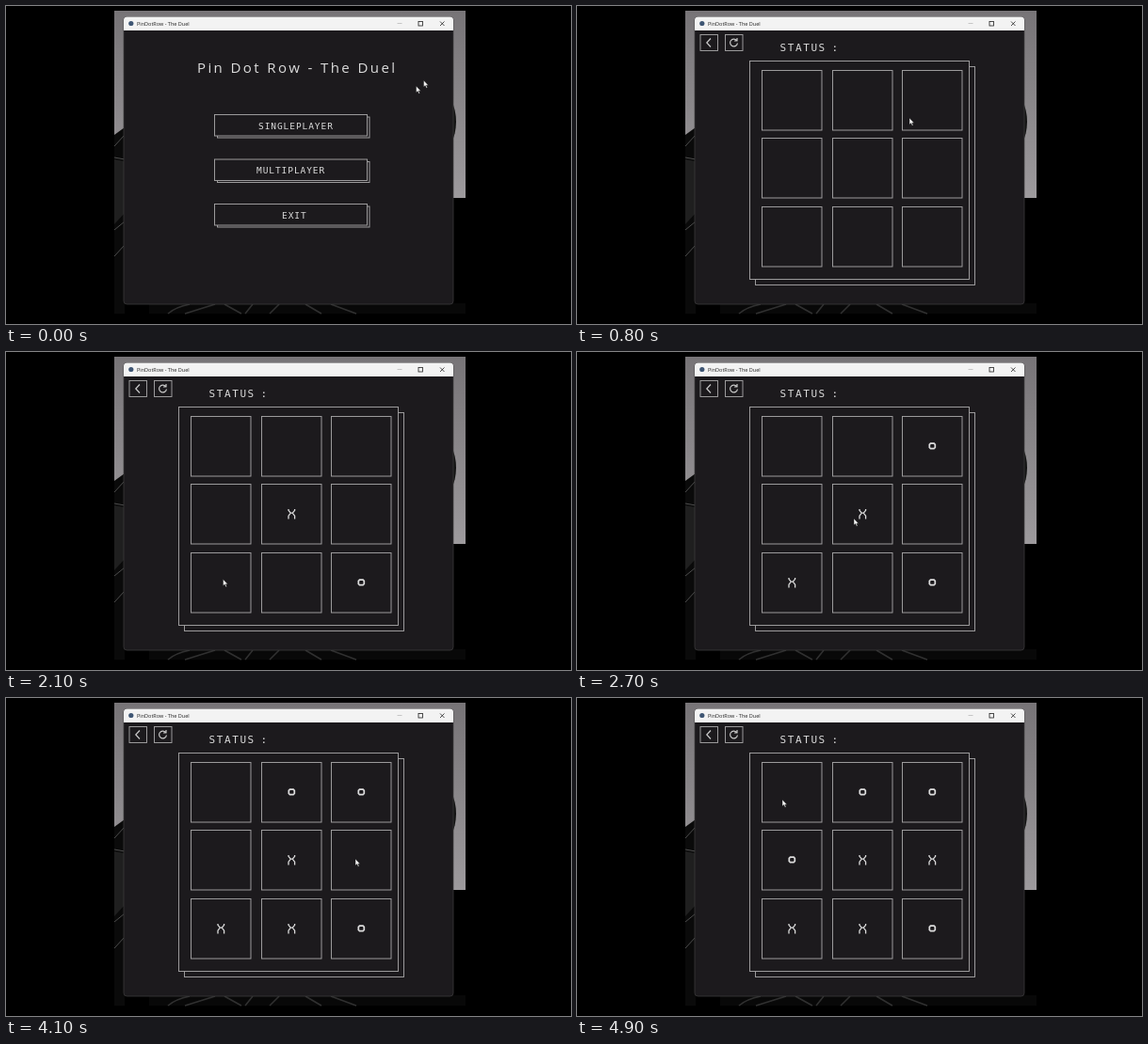
Animation, 600 px wide and 338 px high, one loop 5 s. Source, as an HTML page:

```html
<!DOCTYPE html>
<html lang="en">
<head>
<meta charset="utf-8">
<title>Board game</title>
<style>
  html, body { margin: 0; width: 100%; height: 100%; overflow: hidden; background: #000; }
  svg { display: block; width: 100vw; height: 100vh; }
  text { fill: #dcdcdc; white-space: pre; }
  .pixel { font: 9.5px "DejaVu Sans Mono", monospace; letter-spacing: .93px; }
  .status { font-size: 11px; letter-spacing: 1.6px; word-spacing: -2.5px; }
  .heading { font: 15px "Open Sans", sans-serif; letter-spacing: 2.4px; }
  .caption { font: 5.5px "Open Sans", sans-serif; fill: #222; }
  .box { fill: #1c1a1d; stroke: #a2a1a2; stroke-width: .95; }
  .icon { fill: none; stroke: #c8c8c8; stroke-width: 1.2; }
  .mark { fill: none; stroke: #dcdcdc; }
</style>
</head>
<body>
<svg viewBox="0 0 600 338">
  <defs>
    <linearGradient id="wall" x2="0" y2="1">
      <stop offset="0" stop-color="#777477"/>
      <stop offset="1" stop-color="#9d9a9d"/>
    </linearGradient>
    <path id="arrow" d="M0 0V7L1.7 5.6L2.9 8.2L4 7.7L2.9 5.2H5Z" fill="#f2f2f2" stroke="#111" stroke-width=".4"/>
    <path id="x" class="mark" stroke-width="1.3" d="M-3.3-5V-3.6L-1-.8H1L3.300-3.600V-5M-1-.8L-3.300 2.200V5.500M1-.8L3.300 2.200V5.500"/>
    <path id="o" class="mark" stroke-width="1.7" d="M-1.800-2.700H1.800L3-1.500V1.500L1.800 2.700H-1.800L-3 1.500V-1.500Z"/>
  </defs>

  <!-- desktop -->
  <rect width="600" height="338"/>
  <rect x="115" y="5" width="373" height="199" fill="url(#wall)"/>
  <ellipse cx="460" cy="123" rx="18" ry="32" fill="#131313"/>
  <path d="M115 137L126 129V327H115Z" fill="#0a0a0a"/>
  <path d="M115 163L126 165V220L115 232Z" fill="#1f1f1f"/>
  <path d="M115 149L126 137M115 161L126 163M115 238L126 229M115 266L126 254" fill="none" stroke="#4c4c4c"/>
  <rect x="152" y="316" width="336" height="11" fill="#080808"/>
  <path d="M172 327Q180 320 195 317M190 327L222 317M232 317L250 327M262 317L254 327M290 317L280 327M318 317L335 327M345 317L372 327" fill="none" stroke="#303030" stroke-width="1.500"/>

  <!-- window -->
  <rect x="125" y="11.500" width="350" height="305.500" rx="3.500" fill="#1c1a1d" stroke="#414041" stroke-width=".7"/>
  <path d="M125 26V15Q125 11.500 128.500 11.500H471.500Q475 11.500 475 15V26Z" fill="#f3f3f3"/>
  <circle cx="132.800" cy="18.500" r="2.600" fill="#3f5674"/>
  <text class="caption" x="139" y="20.500">PinDotRow - The Duel</text>
  <g fill="none" stroke="#222" stroke-width=".8">
    <path d="M415.500 18.500h5" stroke="#bbb"/>
    <rect x="438" y="16.500" width="4.500" height="4.500"/>
    <path d="M461 16.500l4.500 4.500m0-4.500l-4.500 4.500"/>
  </g>

  <g id="menu">
    <text class="heading" x="203" y="71">Pin Dot Row - The Duel</text>
  </g>

  <g id="game">
    <rect class="box" x="131" y="30.500" width="18.500" height="17"/>
    <rect class="box" x="157.500" y="30.500" width="18.500" height="17"/>
    <path class="icon" d="M142 34.500L137.800 39L142 43.500"/>
    <path class="icon" d="M169.500 36.500A3.900 3.900 0 1 0 170.400 39.500M170 34V37H167"/>
    <text class="pixel status" x="215.500" y="48">STATUS :</text>
    <rect class="box" x="189.500" y="64.500" width="233" height="232"/>
    <rect class="box" x="183.500" y="58.500" width="233" height="232"/>
  </g>

  <use id="ghost" href="#arrow" x="443.500" y="79"/>
  <use id="cursor" href="#arrow"/>
</svg>
<script>
const $ = id => document.getElementById(id);

function add(parent, tag, attrs, text = "") {
  const el = document.createElementNS("http://www.w3.org/2000/svg", tag);
  for (const key in attrs) el.setAttribute(key, attrs[key]);
  el.textContent = text;
  return parent.appendChild(el);
}

const addBox = (parent, x, y, width, height) =>
  add(parent, "rect", { class: "box", x, y, width, height });

[["SINGLEPLAYER", 268, 115.5], ["MULTIPLAYER", 266, 163], ["EXIT", 293, 210.5]].forEach(([label, x, y]) => {
  addBox($("menu"), 224.5, y + 2.5, 161.5, 22);
  addBox($("menu"), 221.5, y, 162, 22.5);
  add($("menu"), "text", { class: "pixel", x, y: y + 15.2 }, label);
});

const cols = [196.5, 271.5, 345.5], rows = [68.5, 140.5, 213.5];
for (const y of rows) for (const x of cols) addBox($("game"), x, y, 63.5, 63.5);

// kind, column, row, time of appearance
const marks = [
  ["x", 1, 1, 1300], ["o", 2, 2, 1300],
  ["x", 0, 2, 2200], ["o", 2, 0, 2200],
  ["x", 1, 2, 3300], ["o", 1, 0, 3300],
  ["x", 2, 1, 4400], ["o", 0, 1, 4400]
].map(([kind, col, row, time]) => ({
  time,
  el: add($("game"), "use", { href: "#" + kind, x: cols[col] + 31.8, y: rows[row] + 31.4 })
}));

// time, x, y of the pointer tip
const path = [
  [0, 435.5, 85], [600, 367, 114], [800, 353, 119], [1200, 303, 190],
  [1600, 301, 193], [2000, 232, 240], [2200, 229, 243], [2400, 229, 243],
  [2700, 294, 177], [3000, 293, 176], [3400, 295, 248], [3600, 294, 252],
  [3700, 294, 252], [4100, 371, 171], [4400, 371, 171], [4800, 221, 111],
  [4900, 218, 108], [5000, 218, 108]
];

const show = (el, on) => el.style.display = on ? "" : "none";

function draw(now) {
  const t = Math.floor(now % 5000 / 100) * 100; // ten steps a second
  const i = path.findIndex(p => p[0] > t);
  const [t0, x0, y0] = path[i - 1], [t1, x1, y1] = path[i];
  const k = (t - t0) / (t1 - t0);
  $("cursor").setAttribute("x", x0 + (x1 - x0) * k);
  $("cursor").setAttribute("y", y0 + (y1 - y0) * k);
  show($("ghost"), t < 100);
  show($("menu"), t < 700);
  show($("game"), t >= 700);
  for (const mark of marks) show(mark.el, t >= mark.time);
}

const start = performance.now();
function loop() {
  draw(performance.now() - start);
  requestAnimationFrame(loop);
}
loop();
</script>
</body>
</html>
```
